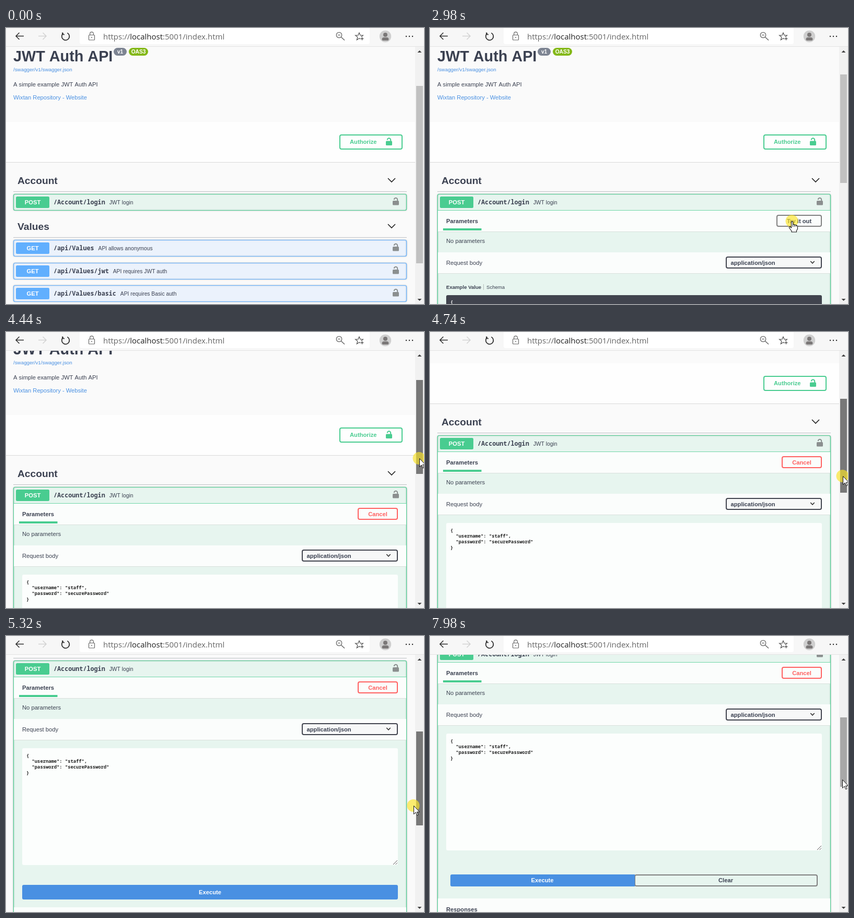
These frames come from a looping animation (800 px wide and 529 px high, 8000 ms). An HTML page with a canvas:

```html
<!DOCTYPE html>
<html lang="en">
<head>
<meta charset="utf-8">
<title>API explorer</title>
<style>
html, body { margin: 0; width: 100%; height: 100%; overflow: hidden; background: #fafafa; }
canvas { display: block; }
</style>
</head>
<body>
<canvas id="stage" width="800" height="529"></canvas>
<script>
const ctx = document.getElementById('stage').getContext('2d', { alpha: false });
const LOOP = 8000;
const INK = '#3b4151', GREEN = '#49cc90', BLUE = '#61affe', MINT = '#e7f5ef';
const SANS = '"Liberation Sans", Arial, sans-serif';
const MONO = '"Noto Sans Mono", monospace';
const BODY = '11.2px ' + SANS, BOLD = 'bold 11.2px ' + SANS;

// [start, scroll offset]
const SCROLL = [[0, 0], [4240, 10], [4440, 21], [4560, 83], [4740, 120], [4880, 150],
  [5000, 183], [5190, 225], [5320, 271], [5510, 293], [5700, 299]];

// [start, x, y, shape, pressed]
const POINTER = [
  [0, 0, 0, 'none'], [1390, 595, 368, 'arrow'], [1520, 213, 339, 'hand'],
  [1840, 213, 339, 'hand', 1], [2160, 213, 339, 'hand'], [2350, 402, 355, 'arrow'],
  [2480, 594, 371, 'arrow'], [2670, 693, 370, 'hand'], [2860, 693, 370, 'hand', 1],
  [3110, 693, 370, 'hand'], [3290, 764, 247, 'arrow'], [3480, 783, 231, 'arrow'],
  [3600, 787, 223, 'arrow'], [3790, 788, 223, 'arrow'], [4240, 791, 238, 'arrow', 1],
  [4440, 791, 242, 'arrow', 1], [4560, 791, 265, 'arrow', 1], [4740, 790, 276, 'arrow', 1],
  [4880, 790, 287, 'arrow', 1], [5000, 788, 297, 'arrow', 1], [5190, 785, 311, 'arrow', 1],
  [5320, 780, 325, 'arrow', 1], [5510, 777, 333, 'arrow', 1], [5700, 776, 336, 'arrow', 1],
  [5950, 760, 336, 'arrow'], [6080, 734, 334, 'beam'], [6260, 193, 284, 'beam'],
  [6400, 143, 277, 'beam'], [6590, 220, 382, 'beam'], [6780, 310, 424, 'arrow'],
  [6910, 396, 466, 'hand'], [7220, 396, 466, 'hand', 1], [7350, 396, 466, 'hand'],
  [7540, 520, 410, 'arrow'], [7670, 660, 338, 'beam'], [7790, 776, 280, 'arrow'],
  [7980, 789, 275, 'arrow']];

const at = (steps, t) => steps.filter(s => s[0] <= t).pop();

function rect(x, y, w, h, color) {
  ctx.fillStyle = color;
  ctx.fillRect(x, y, w, h);
}

function box(x, y, w, h, r, fill, stroke, line = 1) {
  ctx.beginPath();
  ctx.roundRect(x, y, w, h, r);
  if (fill) { ctx.fillStyle = fill; ctx.fill(); }
  if (stroke) { ctx.strokeStyle = stroke; ctx.lineWidth = line; ctx.stroke(); }
}

function text(str, x, y, font = BODY, color = INK, align = 'left') {
  ctx.font = font;
  ctx.fillStyle = color;
  ctx.textAlign = align;
  ctx.fillText(str, x, y);
  return x + ctx.measureText(str).width;
}

function path(points, color, width = 1.5, fill) {
  ctx.beginPath();
  for (let i = 0; i < points.length; i += 2) ctx.lineTo(points[i], points[i + 1]);
  if (fill) { ctx.closePath(); ctx.fillStyle = fill; ctx.fill(); }
  if (color) { ctx.strokeStyle = color; ctx.lineWidth = width; ctx.stroke(); }
}

function arc(x, y, r, fill, stroke, width = 1.3, from = 0, to = 7) {
  ctx.beginPath();
  ctx.arc(x, y, r, from, to);
  if (fill) { ctx.fillStyle = fill; ctx.fill(); }
  if (stroke) { ctx.strokeStyle = stroke; ctx.lineWidth = width; ctx.stroke(); }
}

const chevron = (x, y, w, h, width) =>
  path([x - w, y - h, x, y + h, x + w, y - h], '#222', width);

function openLock(x, y, color) {
  box(x, y + 6, 12, 8.5, 1.5, color);
  ctx.beginPath();
  ctx.moveTo(x + 9.2, y + 7);
  ctx.lineTo(x + 9.2, y + 4);
  ctx.arc(x + 6, y + 4, 3.2, 0, Math.PI, true);
  ctx.strokeStyle = color;
  ctx.lineWidth = 2;
  ctx.stroke();
}

function group(name, y) {
  text(name, 22, y, 'bold 19.2px ' + SANS);
  chevron(738, y - 7.5, 7, 3.5, 1.6);
  rect(14, y + 14, 753, 1, '#bdbfc3');
}

function operation(y, method, route, note, color, tint, height = 31) {
  ctx.save();
  ctx.shadowColor = 'rgba(0,0,0,.19)';
  ctx.shadowBlur = 3;
  box(14.5, y + .5, 752, height, 3, tint, color, 1.2);
  ctx.restore();
  box(19, y + 5, 64, 22, 2.5, color);
  text(method, 51, y + 20, BOLD, '#fff', 'center');
  const end = text(route, 91, y + 20, 'bold 11.75px ' + MONO);
  text(note, end + 8, y + 19.5, '10.3px ' + SANS);
  openLock(740, y + 7, '#8b8f8f');
}

function band(y, h) {
  rect(15, y, 751, h, '#fbfdfc');
  rect(15, y + h, 751, 1, '#d8e0dc');
}

function outlineButton(label, x, color) {
  box(x + 1, 359, 748 - x, 21, 3, '#fbfdfc', color, 2);
  text(label, (x + 750) / 2, 374, BOLD, color === '#808080' ? INK : color, 'center');
}

function drawEditor(done) {
  box(31, 486, 719, 224, 3, '#fcfefd');
  ['{', '  "username": "staff",', '  "password": "securePassword"', '}'].forEach((line, i) =>
    text(line, 39, 503 + i * 11, '600 8.8px ' + MONO, '#222'));
  path([741, 709, 749, 701], '#555', 1);
  path([745.5, 709, 749, 705.5], '#555', 1);
  if (done) {
    box(392, 757, 349, 21, 3, null, '#808080', 2);
    box(39, 756, 353, 23, [3, 0, 0, 3], '#4990e2');
    text('Execute', 215, 771, BOLD, '#fff', 'center');
    text('Clear', 566, 771, BOLD, INK, 'center');
  } else {
    box(31, 748, 719, 28, 3, '#4990e2');
    text('Execute', 390.5, 766, BOLD, '#fff', 'center');
  }
  const top = done ? 802 : 791;
  band(top, 41);
  text('Responses', 31, top + 25, BOLD);
}

function drawPanel(mode) {
  rect(15, 349, 751, 1, '#6fd6a8');
  band(350, 40);
  text('Parameters', 31, 374, BOLD);
  rect(25, 384, 73.5, 4, GREEN);
  if (mode === 'open') outlineButton('Try it out', 663, '#808080');
  else outlineButton('Cancel', 673, '#ff6060');
  text('No parameters', 31, 412);
  band(430, 40);
  text('Request body', 31, 454);
  box(567, 439, 182, 21, 3, '#f7f8f8', '#41444e', 2);
  text('application/json', 575.5, 454, BOLD);
  chevron(732, 449, 3.7, 1.9, 1.5);
  if (mode === 'open') {
    text('Example Value', 31, 500, 'bold 9.6px ' + SANS);
    rect(102, 491, 1, 11, '#b5bdb9');
    text('Schema', 108, 500, '9.6px ' + SANS);
    box(31, 512, 719, 120, 3, '#41444e');
    text('{', 39, 528, '600 8.8px ' + MONO, '#fff');
  } else {
    drawEditor(mode === 'done');
  }
}

function drawPage(mode, scroll) {
  ctx.save();
  ctx.beginPath();
  ctx.rect(0, 36, 783, 493);
  ctx.clip();
  rect(0, 36, 783, 493, '#fafafa');
  ctx.translate(0, -scroll);

  text('JWT Auth API', 14, 64, 'bold 28.8px ' + SANS);
  box(206, 38, 25, 15, 7.5, '#7d8492');
  text('v1', 218.5, 49, 'bold 10px ' + SANS, '#fff', 'center');
  box(235, 38, 37, 15, 7.5, '#84b818');
  text('OAS3', 253.5, 49, 'bold 10.2px ' + SANS, '#fff', 'center');
  text('/swagger/v1/swagger.json', 14, 83, '9.8px ' + SANS, '#4990e2');
  text('A simple example JWT Auth API', 14, 112);
  text('Wixtan Repository - Website', 14, 137, BODY, '#4990e2');

  rect(0, 180, 783, 77, '#fefefe');
  rect(0, 257, 783, 1, '#d9d9d9');
  box(639, 205, 119, 27, 3, '#fefefe', GREEN, 2);
  text('Authorize', 658, 222, BOLD, GREEN);
  openLock(727, 210.5, GREEN);

  group('Account', 299);
  const open = mode !== 'list';
  operation(318, 'POST', '/Account/login', 'JWT login', GREEN, MINT, open ? 900 : 31);
  if (open) {
    drawPanel(mode);
  } else {
    group('Values', 387);
    operation(406, 'GET', '/api/Values', 'API allows anonymous', BLUE, '#ebf2fc');
    operation(450, 'GET', '/api/Values/jwt', 'API requires JWT auth', BLUE, '#ebf2fc');
    operation(493, 'GET', '/api/Values/basic', 'API requires Basic auth', BLUE, '#ebf2fc');
  }
  ctx.restore();
}

function drawScrollbar(mode, scroll, t) {
  rect(783, 36, 17, 493, '#f1f1f1');
  path([787.5, 47, 791.5, 43, 795.5, 47], null, 0, '#404040');
  path([787.5, 519, 791.5, 523, 795.5, 519], null, 0, '#404040');
  const [top, height] = {
    list: [111, 340], open: [89, 208], edit: [84 + scroll * .364, 180], done: [156, 133]
  }[mode];
  const dragging = t >= 4240 && t < 5950;
  const hover = t >= 7980 || (t >= 3600 && t < 4240);
  rect(785, Math.round(top), 13, height, dragging ? '#787878' : hover ? '#a8a8a8' : '#c1c1c1');
}

function drawToolbar() {
  const dark = '#2b2b2b', mid = '#666';
  rect(0, 0, 800, 36, '#f7f7f7');
  rect(0, 35, 800, 1, '#e3e3e3');
  box(141, -5, 555, 36, 4, '#fff');

  path([34, 15.5, 19, 15.5], dark);
  path([25.5, 9, 19, 15.5, 25.5, 22], dark);
  path([62, 15.5, 77, 15.5], '#d2d2d2');
  path([70.5, 9, 77, 15.5, 70.5, 22], '#d2d2d2');
  arc(114, 16, 7.3, null, dark, 1.7, -1.1, 4.1);
  path([108, 8.5, 108, 12.5, 112, 12.5], dark, 1.6);

  box(158.5, 13.5, 11, 9.5, 1, null, mid, 1.2);
  ctx.beginPath();
  ctx.moveTo(160.7, 13.5);
  ctx.arc(164, 11, 3.3, Math.PI, 0);
  ctx.lineTo(167.3, 13.5);
  ctx.stroke();
  arc(164, 18, 1, mid);

  const urlFont = '15px "Open Sans", sans-serif';
  let x = text('https://', 186, 22, urlFont, '#666');
  x = text('localhost', x, 22, urlFont, '#222');
  text(':5001/index.html', x, 22, urlFont, '#666');

  arc(637.5, 13.5, 5.2, null, mid);
  path([641.5, 17.5, 648, 23.5], mid);
  path([635, 13.5, 640, 13.5], mid, 1.2);

  const star = [];
  for (let i = 0; i < 10; i++) {
    const a = i * Math.PI / 5 - Math.PI / 2, r = i % 2 ? 3.3 : 7.8;
    star.push(676 + r * Math.cos(a), 16.5 + r * Math.sin(a));
  }
  path([...star, star[0], star[1]], '#555', 1.2);
  rect(678, 17, 8, 8, '#fff');
  path([678.5, 20.5, 684.5, 20.5], '#444', 1.2);
  path([681.5, 17.5, 681.5, 23.5], '#444', 1.2);

  arc(726, 16, 11.2, '#cfcfcf');
  arc(726, 13, 4, '#7b7878');
  box(719.5, 18, 13, 6, [5, 5, 3, 3], '#7b7878');
  for (const dx of [0, 6, 12]) arc(766 + dx, 16, 1.2, dark);
}

function drawPointer([, x, y, shape, pressed]) {
  if (shape === 'none') return;
  if (pressed) arc(x - .5, y, 12, 'rgba(250,228,40,.66)');
  ctx.save();
  ctx.translate(x, y);
  ctx.lineJoin = 'round';
  if (shape === 'arrow') {
    path([.5, .5, .5, 16.5, 4.2, 13, 6.8, 18.8, 9, 17.8, 6.5, 12.2, 11.5, 12.2, .5, .5], '#111', 1, '#fff');
  } else if (shape === 'hand') {
    path([-1.5, 1.5, 0, .5, 1.5, 1.5, 1.5, 6.5, 4, 6.5, 5, 7.5, 7.5, 7.5, 8.5, 8.5, 10, 9, 10.5, 10,
      10.5, 15, 8.5, 18.5, 8.5, 21, -1, 21, -1, 19, -5.5, 13, -5.5, 11, -4, 10.5, -1.5, 13, -1.5, 1.5],
      '#111', 1.1, '#fff');
    for (const dx of [1.5, 4.5, 7.5]) path([dx, 7, dx, 11], '#111', 1);
  } else {
    path([-3.5, -7.5, -1, -7.5, 0, -6.5, 1, -7.5, 3.5, -7.5], '#111', 1.1);
    path([0, -6.5, 0, 6.5], '#111', 1.2);
    path([-3.5, 7.5, -1, 7.5, 0, 6.5, 1, 7.5, 3.5, 7.5], '#111', 1.1);
  }
  ctx.restore();
}

function render(t) {
  const mode = t < 2160 ? 'list' : t < 3110 ? 'open' : t < 7350 ? 'edit' : 'done';
  const scroll = at(SCROLL, t)[1];
  drawPage(mode, scroll);
  drawScrollbar(mode, scroll, t);
  drawToolbar();
  drawPointer(at(POINTER, t));
}

const start = performance.now();
function tick() {
  render((performance.now() - start) % LOOP);
  requestAnimationFrame(tick);
}
tick();
</script>
</body>
</html>
```
